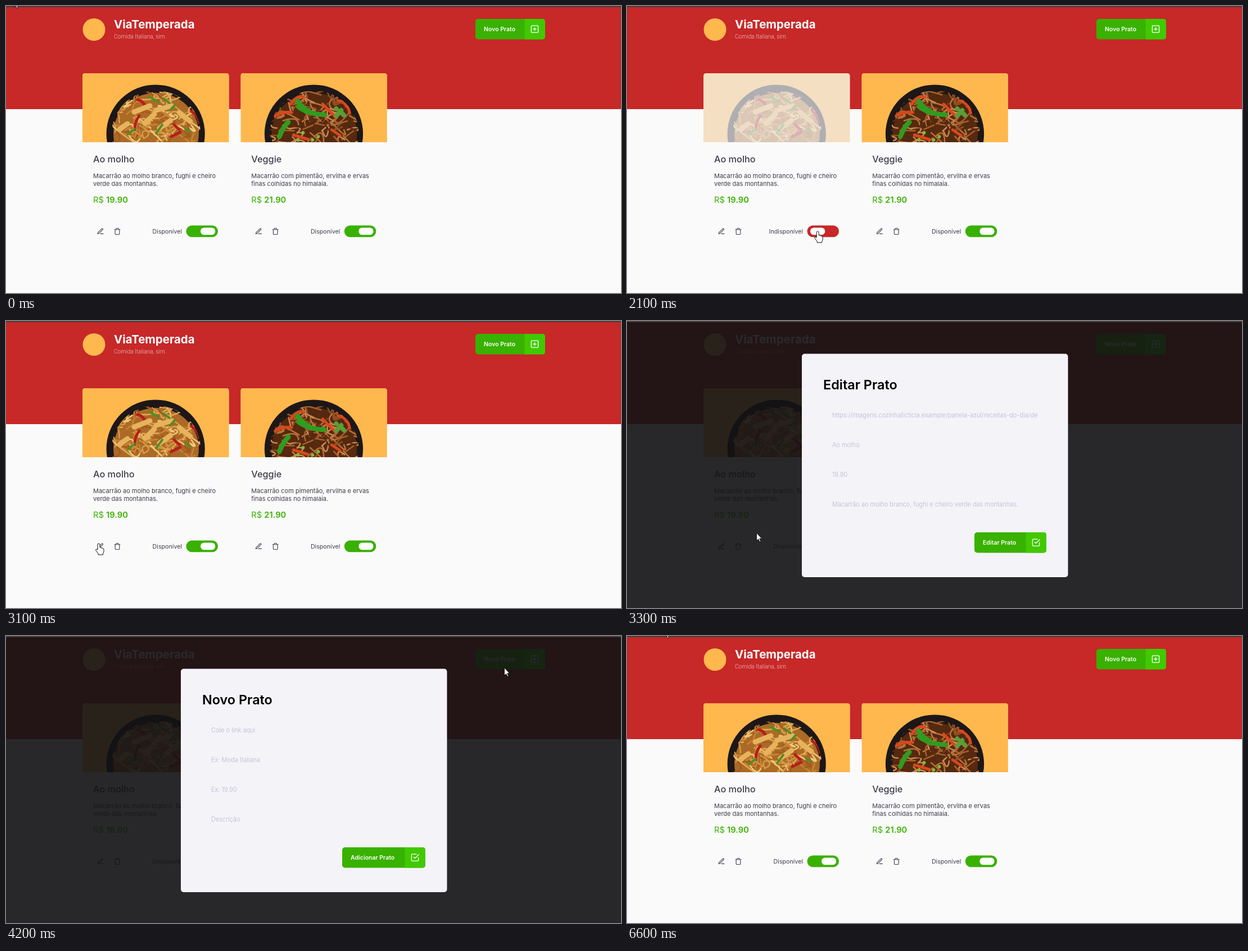
Recreate the animation shown at these times as an HTML page. Size 1094 by 512 pixels, loop 6800 ms.

```html
<!DOCTYPE html>
<html lang="pt">
<head>
<meta charset="utf-8">
<style>
  html, body { margin: 0; height: 100%; overflow: hidden; background: #fafafa; }
  svg { display: block; }
  #stage { width: 100%; height: 100%; }
  text { font-family: Inter, "Open Sans", sans-serif; font-size: 11px; fill: #3d3d4d; white-space: pre; }
  .icon { fill: none; stroke: #3d3d4d; stroke-width: 2; stroke-linecap: round; stroke-linejoin: round; }
  .light { stroke: #fff; }
  .hint { fill: #b7b7cc; font-weight: 300; }
  .button { fill: #fff; font-weight: 600; font-size: 10.5px; }
  .strips path { fill: none; stroke-linecap: round; }
</style>
</head>
<body>
<svg id="stage" viewBox="0 0 1094 512">
  <defs>
    <clipPath id="photoClip"><path d="M0 123V5q0-5 5-5h250.5q5 0 5 5v118z"/></clipPath>
    <clipPath id="foodClip"><ellipse cx="131" cy="107" rx="79" ry="76"/></clipPath>
    <clipPath id="fieldClip"><rect x="365" y="150" width="366" height="200"/></clipPath>
  </defs>
  <g id="page"></g>
  <g id="modal"></g>
  <path fill="#453d3b" d="M0 0h1094v2H0z"/>
  <path id="cursor" fill="#fff" stroke="#111" stroke-linejoin="round"/>
</svg>
<script>
const LOOP = 6800, STEP = 100;
const GREEN = [57, 177, 0], RED = [199, 40, 40];
const byId = id => document.getElementById(id);

const ICONS = {
  edit: 'M12 20h9M16.5 3.5a2.1 2.1 0 0 1 3 3L7 19l-4 1 1-4z',
  trash: 'M3 6h18M19 6v14a2 2 0 0 1-2 2H7a2 2 0 0 1-2-2V6m3 0V4a2 2 0 0 1 2-2h4a2 2 0 0 1 2 2v2',
  plus: 'M5 3h14a2 2 0 0 1 2 2v14a2 2 0 0 1-2 2H5a2 2 0 0 1-2-2V5a2 2 0 0 1 2-2M12 8v8M8 12h8',
  check: 'M9 11l3 3L22 4M21 12v7a2 2 0 0 1-2 2H5a2 2 0 0 1-2-2V5a2 2 0 0 1 2-2h11'
};
const POINTER = 'M0 0V14L3.1 11.1 5.4 15.9 7.4 15 5.3 10.3H9.4Z';
const HAND = 'M-2 2Q-2 0 0 0T2 2V7Q4.5 6 4.8 8Q7 7 7.3 9Q9 8.5 9 11V14Q9 16 7.5 18V20H-1V18L-5 12.5Q-6 10.5-4.5 10Q-3 9.8-2 11Z';

const icon = (name, cx, cy, scale, cls = '') =>
  `<path class="icon ${cls}" d="${ICONS[name]}" transform="translate(${cx} ${cy}) scale(${scale}) translate(-12 -12)"/>`;
const text = (x, y, content, attrs = '') => `<text x="${x}" y="${y}" ${attrs}>${content}</text>`;

function button(left, right, top, label, iconName) {
  const split = right - 36.5;
  return `<rect x="${left}" y="${top}" width="${right - left}" height="36.5" rx="5" fill="#39b100"/>
    <path d="M${split} ${top}h31.5q5 0 5 5v26.5q0 5-5 5h-31.5z" fill="#41c900"/>
    ${text(left + 15, top + 22, label, 'class="button"')}
    ${icon(iconName, right - 18.5, top + 18.2, .68, 'light')}`;
}

function noodles(seed, colors) {
  const random = () => (seed = (seed * 16807) % 2147483647) / 2147483647;
  const spread = size => (random() - .5) * size;
  return Array.from({ length: 120 }, (_, i) => {
    const x = 131 + spread(160), y = 85 + spread(110);
    return `<path d="M${x} ${y}q${spread(60)} ${spread(50)} ${spread(60)} ${spread(45)}"
      stroke="${colors[i % colors.length]}" stroke-width="2.6"/>`;
  }).join('');
}

const strips = (color, width, d) => `<path d="${d}" stroke="${color}" stroke-width="${width}"/>`;

const DISHES = [
  {
    x: 136, title: 'Ao molho', price: '19.90',
    lines: ['Macarrão ao molho branco, fughi e cheiro', 'verde das montanhas.'],
    base: '#ab6a26',
    food: noodles(71, ['#e2aa52', '#c98534', '#efc878', '#a35a20', '#d79a45']) +
      strips('#b81d1b', 5, 'M98 47q12 3 14 15M101 76q-8 10-8 24M163 92l9 8M194 68q12 8 14 20M158 113l16-8') +
      strips('#e6b35d', 9, 'M92 69l28-11M131 66l28-8M111 89l17-16M66 100l14-10M172 70l20 16M137 98l20-14') +
      strips('#4f8d28', 4, 'M119 42l16 9M144 45l11 8M81 109l12-10M131 107l11-15M183 98l8 6M156 66l8-9')
  },
  {
    x: 417.3, title: 'Veggie', price: '21.90',
    lines: ['Macarrão com pimentão, ervilha e ervas', 'finas colhidas no himalaia.'],
    base: '#54290f',
    food: noodles(193, ['#8f4f22', '#b87238', '#5c2a10', '#a5602c', '#c98a50']) +
      strips('#dc461d', 5, 'M89 55q12-18 24-12M61 76q18-9 30-6M94 110l26 8M146 55l24 24M174 49q17 4 20 22M162 101l15 10M70 103l13-14') +
      strips('#2f9c20', 8.5, 'M101 49q9 14 20 18M103 60q18 13 46 14M85 87q-9 8-16 26') +
      strips('#5b9d38', 8, 'M170 76l5-5M178 67l1-1M184 75l-3-3M170 63l1 1') +
      strips('#83ba36', 6, 'M128 119h.1M138 113h.1M111 106h.1M102 119h.1')
  }
];

const card = (dish, i) => `<g transform="translate(${dish.x})">
  <g transform="translate(0 120)" clip-path="url(#photoClip)">
    <path fill="#f0f0f5" d="M0 0h261v123H0z"/>
    <g id="photo${i}">
      <path fill="#ffb84d" d="M0 0h261v123H0z"/>
      <circle cx="130.2" cy="108" r="87.6" fill="#1d1717"/>
      <g class="strips" clip-path="url(#foodClip)">
        <ellipse cx="131" cy="108" rx="76" ry="73" fill="${dish.base}"/>${dish.food}
      </g>
    </g>
  </g>
  ${text(19, 279, dish.title, 'style="font-size:16.3px;font-weight:500"')}
  ${dish.lines.map((line, n) => text(19, 306.5 + n * 14.5, line)).join('')}
  ${text(19, 351, `R$ <tspan font-weight="600">${dish.price}</tspan>`, 'style="font-size:14.7px;fill:#39b100"')}
  ${icon('edit', 32, 402, .55)}${icon('trash', 62, 402, .55)}
  ${text(177, 405.5, 'Disponível', `id="label${i}" text-anchor="end" style="font-size:10.7px"`)}
  <rect id="track${i}" x="184.5" y="391.5" width="56.5" height="20.7" rx="10.3" fill="rgb(${GREEN})"/>
  <rect id="thumb${i}" x="210" y="395.5" width="26.3" height="12.8" rx="6.4" fill="#fff"/>
</g>`;

byId('page').innerHTML = `
  <path fill="#c72828" d="M0 0h1094v184H0z"/>
  <circle cx="156.5" cy="42" r="20" fill="#ffb84d"/>
  ${text(192, 39.5, 'ViaTemperada', 'style="font-size:20.4px;font-weight:700;fill:#fff"')}
  ${text(192, 58, 'Comida Italiana, sim.', 'style="font:300 10.2px Roboto,sans-serif;fill:#f3c4c4"')}
  ${button(835, 959, 23, 'Novo Prato', 'plus')}
  ${DISHES.map(card).join('')}`;

const dialog = (title, fields, action, left) => `
  <path fill="#121214" fill-opacity=".9" d="M0 0h1094v512H0z"/>
  <rect x="311" y="58.5" width="473.5" height="398.5" rx="5" fill="#f4f3f8"/>
  ${text(349, 121.5, title, 'style="font-size:23.4px;font-weight:600;fill:#000"')}
  <g clip-path="url(#fieldClip)">
    ${fields.map((field, i) => text(365, 172 + i * 53.1, field, 'class="hint"')).join('')}
  </g>
  ${button(left, 746, 377, action, 'check')}`;

const DIALOGS = [
  {
    from: 3300, to: 3600,
    html: dialog('Editar Prato', ['https:\/\/imagens.cozinhaficticia.example/panela-azul/receitas-do-dia/des',
      'Ao molho', '19.90', 'Macarrão ao molho branco, fughi e cheiro verde das montanhas.'], 'Editar Prato', 618)
  },
  {
    from: 4200, to: 5000,
    html: dialog('Novo Prato', ['Cole o link aqui', 'Ex: Moda Italiana', 'Ex: 19.90', 'Descrição'], 'Adicionar Prato', 598)
  }
];

// Cursor path: time, x, y
const PATH = [
  [0, 14, -12], [300, 130, 180], [600, 300, 411], [700, 330, 401], [1300, 340, 402], [2300, 339, 402],
  [2400, 300, 398], [2500, 252, 391.5], [2700, 184, 396], [2900, 171, 397], [3100, 165, 397], [3200, 165, 397],
  [3300, 230.5, 378], [3500, 240, 374], [3900, 830, 90], [4000, 889, 49], [4100, 889, 49], [4200, 886.5, 56.5],
  [4300, 886, 99], [4400, 886, 99], [4700, 876, 202], [4900, 876, 202], [5000, 833.5, 236.5], [5300, 500, 340],
  [5600, 197, 395], [5900, 197, 395], [6300, 75, 150], [6500, 40, 12], [6600, 67, -12], [LOOP, 67, -12]
];
// Clickable areas: left, top, right, bottom
const HOT = [[321, 391, 377, 412], [156, 390, 180, 414], [186, 390, 210, 414], [835, 23, 959, 59]];

function cursorAt(t) {
  const i = PATH.findIndex(point => point[0] > t);
  const [t0, x0, y0] = PATH[i - 1], [t1, x1, y1] = PATH[i];
  const p = (t - t0) / (t1 - t0);
  return [x0 + (x1 - x0) * p, y0 + (y1 - y0) * p];
}

const easeOut = p => 1 - (1 - Math.min(1, Math.max(0, p))) ** 2;
// 0 = available, 1 = unavailable
const offAmount = (t, duration) => easeOut((t - 1420) / duration) - easeOut((t - 2500) / duration);

let openDialog;
function render(t) {
  const slide = offAmount(t, 400);
  byId('photo0').setAttribute('opacity', 1 - .7 * offAmount(t, 300));
  byId('thumb0').setAttribute('x', 210 - 20 * slide);
  byId('track0').setAttribute('fill', `rgb(${GREEN.map((c, i) => Math.round(c + (RED[i] - c) * slide))})`);
  byId('label0').textContent = t >= 1420 && t < 2500 ? 'Indisponível' : 'Disponível';

  const current = DIALOGS.find(d => t >= d.from && t < d.to);
  if (current !== openDialog) {
    openDialog = current;
    byId('modal').innerHTML = current ? current.html : '';
  }

  const [x, y] = cursorAt(t);
  const hovering = !current && HOT.some(([l, top, r, b]) => x >= l && x <= r && y >= top && y <= b);
  byId('cursor').setAttribute('d', hovering ? HAND : POINTER);
  byId('cursor').setAttribute('transform', `translate(${x} ${y})`);
}

function tick() {
  const t = performance.now() % LOOP;
  render(Math.floor(t / STEP) * STEP);
  requestAnimationFrame(tick);
}
tick();
</script>
</body>
</html>
```
